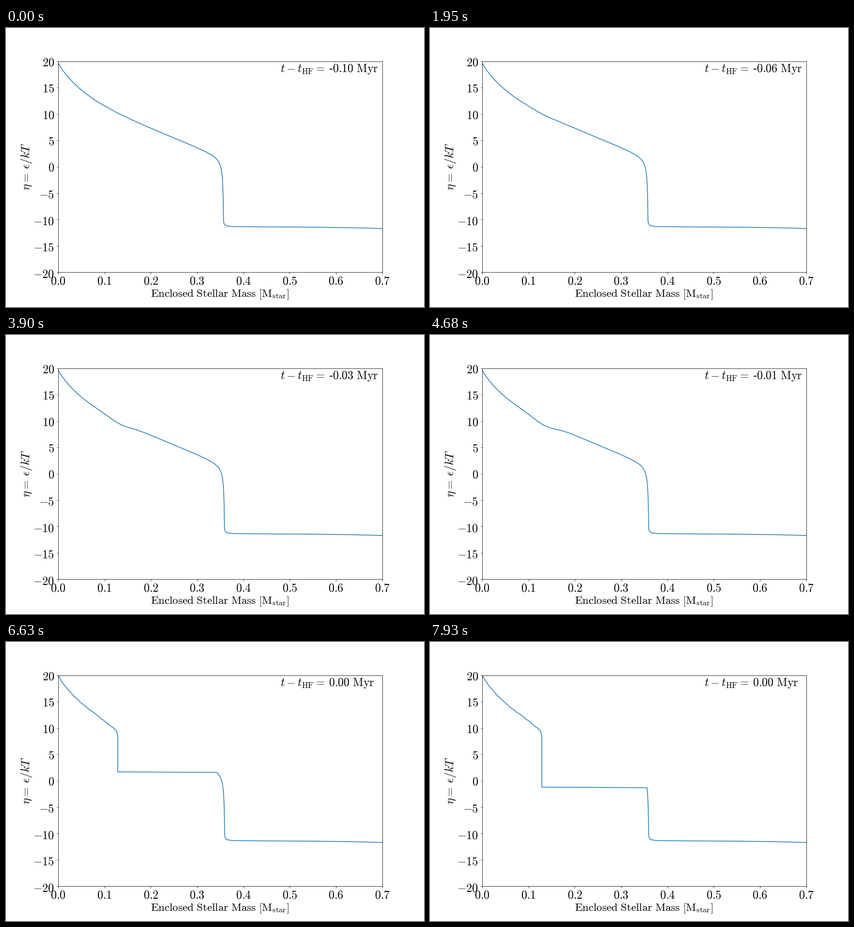
A matplotlib script that plays this animation: 864 px wide and 576 px high, repeating every 8 s.

```python
import matplotlib.pyplot as plt
import numpy as np
from matplotlib.animation import FuncAnimation

W, H = 864, 576
LOOP, TICK, STEP = 8000, 20, 130
IGNITE = 36      # step at which the flash begins
X_IGN = .1286    # mass coordinate of ignition
X_SHELL = .3609  # hydrogen shell, once ignition is reached

plt.rcParams["mathtext.fontset"] = "cm"

grid = np.sort(np.concatenate((np.linspace(0, .7, 1401),
                               np.linspace(.35, .37, 200),
                               [X_IGN, X_IGN + 1e-6])))


def rise(x, scale):
    return 1 - np.exp(-x / scale)


def gauss(x, mid, width):
    return np.exp(-((x - mid) / width) ** 2)


def wiggle(seed, amp, lo, hi):
    rng = np.random.default_rng(seed)
    knots = np.arange(0, .25, .004)
    noise = np.interp(grid, knots, rng.uniform(-1, 1, len(knots)))
    return amp * noise * ((grid > lo) & (grid < hi))


def core(k):
    """Degenerate core, with a dip growing where it heats up."""
    eta = 19.75 - 35 * grid - 5.3 * rise(grid, .055) - .25 * rise(grid, .004)
    eta -= .78 * gauss(grid, .135, .033) * min(k / IGNITE, 1) ** 2
    if k < 32:
        eta += wiggle(k, .04, .02 + .003 * k, .155 + .0007 * k)
    return eta


def with_shell(eta, k):
    """Steep fall at the burning shell, which creeps outwards, and envelope."""
    x = grid + .0025 * max(0, 1 - k / IGNITE)
    gap = np.maximum(X_SHELL - x, 1e-4)
    fall = .0165 / gap * np.exp(-gap / .06)
    envelope = -11.42 + .0018 / np.maximum(x - .358, .0015)
    envelope -= .3 * np.maximum((x - .36) / .34, 0) ** 3
    return np.maximum(eta - fall, envelope)


def with_flash(eta, k):
    """Convective plateau sinking outside the ignition point."""
    inner = grid <= X_IGN
    knee = .9 * min((k - IGNITE) / 6, 1)
    eta = eta - inner * knee * np.exp(-np.abs(X_IGN - grid) / .002)
    level = min(9.3 - .42 * (k - IGNITE), -.6 + 6.13 * np.exp((45 - k) / 6.1))
    flat = level - .45 * (grid - X_IGN)
    eta = np.where(inner, eta, np.minimum(eta, flat))
    if k > 45:
        eta += inner * .3 * (1 - grid / X_IGN) + wiggle(k, .07, .004, .12)
    return eta


def profile(k):
    eta = with_shell(core(k), k)
    return with_flash(eta, k) if k > IGNITE else eta


def clock(k):
    if k >= 50:
        return "0.00"
    return f"\u2010{max(.1 - .0025 * k, 0):.2f}"


fig = plt.figure(figsize=(12, 8), dpi=72, facecolor="white")
ax = fig.add_axes([.125, .125, .775, .755], xlim=(0, .7), ylim=(-20, 20))
ax.set_xticks(np.arange(8) / 10, [])
ax.set_yticks(range(-20, 21, 5), [])


def put(x, y, s, size=24, **kw):
    return fig.text(x / W, 1 - y / H, s, size=size, va="baseline", **kw)


for i in range(8):
    put(108 + 669.6 * i / 7, 529, f"$0.{i}$", ha="center")
for v in range(-20, 21, 5):
    drop = 9.3 if v >= 0 else 11
    put(100, 286.6 - 10.872 * v + drop, f"${v}$", ha="right")

put(442, 555.5, r"$\mathrm{Enclosed\ Stellar\ Mass\ [M_{star}]}$", 22.9, ha="center")
put(49, 286, r"$\eta =\: \epsilon/kT$", 24.3, ha="center",
    rotation=90, rotation_mode="anchor")
stamp = put(567.1, 91.5, "", 23.8, ha="left")
line, = ax.plot([], [], color="#1f77b4", lw=1.5)


def update(n):
    k = min((n * TICK + TICK // 2) // STEP, 61)
    line.set_data(grid, profile(k))
    stamp.set_text(rf"$t-t_{{\mathrm{{HF}}}} =\: \mathrm{{{clock(k)}\ Myr}}$")
    return line, stamp


anim = FuncAnimation(fig, update, frames=LOOP // TICK, interval=TICK,
                     repeat=True, repeat_delay=0)
plt.show()
```
